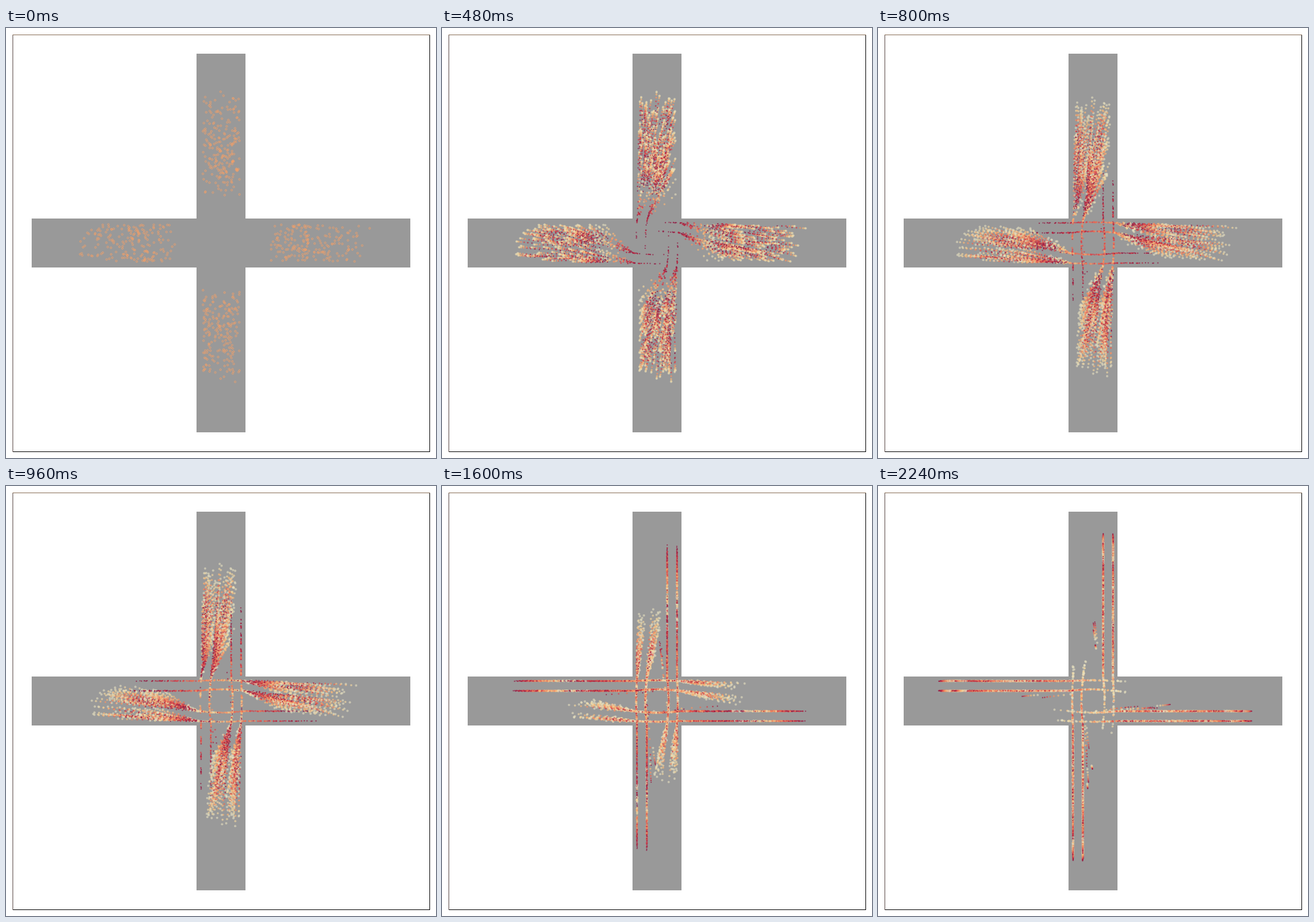
Recreate the animation shown at these times as an HTML page with a canvas. Size 720 by 720 pixels, loop 2320 ms.

```html
<!DOCTYPE html>
<html lang="en">
<head>
<meta charset="utf-8">
<title>Crossing flows</title>
<style>
  html, body { margin: 0; width: 100%; height: 100%; overflow: hidden; background: #fff; }
  canvas { display: block; width: 720px; height: 720px; }
</style>
</head>
<body>
<canvas id="stage" width="720" height="720"></canvas>
<script>
const ctx = document.getElementById('stage').getContext('2d');
const STEP = 80, STEPS = 29, TRAIL = 7;
const GATE = 322, CRUISE = 26, BRAKE = 0.2;
const LANES = [326.5, 343];
const COLORS = ['#931b45', '#b5263f', '#d5454e', '#e86c55', '#f29166', '#f5b679', '#f1d69f', '#e6e0c0'];

let seed = 41;
function rand() {
  seed = (seed * 1664525 + 1013904223) % 4294967296;
  return seed / 4294967296;
}
const between = (a, b) => a + (b - a) * rand();

// Every arm uses q (across) and p (along); place() turns them into x, y.
const arms = [
  { n: 225, core: [114, 264], range: [95, 287], end: 632, place: (q, p) => [q, p] },
  { n: 210, core: [138, 270], range: [113, 282], end: 645, place: (q, p) => [720 - q, 720 - p] },
  { n: 190, core: [128, 268], range: [113, 287], end: 630, place: (q, p) => [p, 720 - q] },
  { n: 200, core: [122, 267], range: [100, 276], end: 623, place: (q, p) => [720 - p, q] }
];

// Start distance: denser towards the gate, with soft ends
function startAt({ core: [from, to], range: [min, max] }) {
  const p = from + (to - from) * Math.pow(rand(), 0.75) + between(-18, 18);
  return Math.min(max, Math.max(min, p));
}

// Distance walked towards the gate, starting slowly
const approach = (a, t) => a.speed * (t - a.lag * (1 - Math.exp(-t / a.lag)));

function makeWalker(arm) {
  const p0 = startAt(arm);
  const q0 = between(329, 391);
  const lane = q0 < 356 ? 0 : 1;
  const a = {
    arm, p0, q0, lane,
    lag: p0 > 250 ? 0.6 : between(4.4, 5.4),
    speed: between(10.6, 12),
    wobble: between(-0.5, 0.5),
    sway: between(-2, 2),
    drift: lane && rand() < 0.025 ? between(6, 20) : 0
  };
  a.gateTime = 0;
  while (approach(a, a.gateTime) < GATE - p0) a.gateTime += 0.02;
  return a;
}

// Walkers line up behind each other at the far end of their lane
function assignStops(group, end) {
  group.sort((a, b) => a.gateTime - b.gateTime);
  group.forEach((a, i) => {
    a.stop = a.drift ? between(440, 520) : end - 182 * i / group.length;
  });
}

const walkers = arms.flatMap(arm => {
  const crowd = Array.from({ length: arm.n }, () => makeWalker(arm));
  LANES.forEach((_, k) => assignStops(crowd.filter(a => a.lane === k), arm.end));
  return crowd;
});

function position(a, t) {
  const lane = LANES[a.lane] + a.wobble;
  const u = t - a.gateTime;
  let p, q;
  if (u < 0) {
    p = a.p0 + approach(a, t);
    const left = Math.max(0, (GATE - p) / (GATE - a.p0));
    q = lane + (a.q0 - lane) * Math.pow(left, 1.1) + a.sway * Math.sin(2 * Math.PI * left);
  } else {
    const rest = Math.min(CRUISE / BRAKE, a.stop - GATE);
    const cruise = (a.stop - rest - GATE) / CRUISE;
    p = u < cruise ? GATE + CRUISE * u : a.stop - rest * Math.exp(-BRAKE * (u - cruise));
    q = lane + a.drift * (1 - Math.exp(-u / 8));
    if (p < 400) q -= (a.lane ? 2.5 : 1.2) * Math.sin(Math.PI * (p - GATE) / 78);
  }
  return a.arm.place(q, p);
}

function dot([x, y], r) {
  ctx.beginPath();
  ctx.arc(x, y, r, 0, 2 * Math.PI);
}

function drawFloor() {
  ctx.globalAlpha = 1;
  ctx.fillStyle = '#fff';
  ctx.fillRect(0, 0, 720, 720);
  ctx.fillStyle = '#999';
  ctx.fillRect(319, 43, 82, 634);
  ctx.fillRect(43, 319, 634, 82);
  ctx.fillStyle = '#000';
  ctx.fillRect(11, 709, 699, 1);
  ctx.fillRect(709, 11, 1, 699);
  ctx.fillStyle = '#5a4a48';
  ctx.fillRect(11, 11, 1, 699);
  ctx.fillStyle = '#8a7058';
  ctx.fillRect(11, 11, 699, 1);
}

function draw(t) {
  drawFloor();
  const length = Math.min(t, TRAIL);
  for (const a of walkers) {
    if (!t) {
      ctx.globalAlpha = 0.9;
      ctx.strokeStyle = '#f5a067';
      ctx.lineWidth = 0.9;
      dot(position(a, 0), 1.5);
      ctx.stroke();
      continue;
    }
    for (let age = length; age >= 0; age--) {
      const f = age / length;
      ctx.globalAlpha = 0.8 - 0.2 * f * f;
      ctx.fillStyle = COLORS[Math.round(f * TRAIL)];
      dot(position(a, t - age), 1.1 + 0.85 * f);
      ctx.fill();
    }
  }
}

let shown = -1;
function tick() {
  const t = Math.floor(performance.now() / STEP) % STEPS;
  if (t !== shown) draw(shown = t);
  requestAnimationFrame(tick);
}
tick();
</script>
</body>
</html>
```
